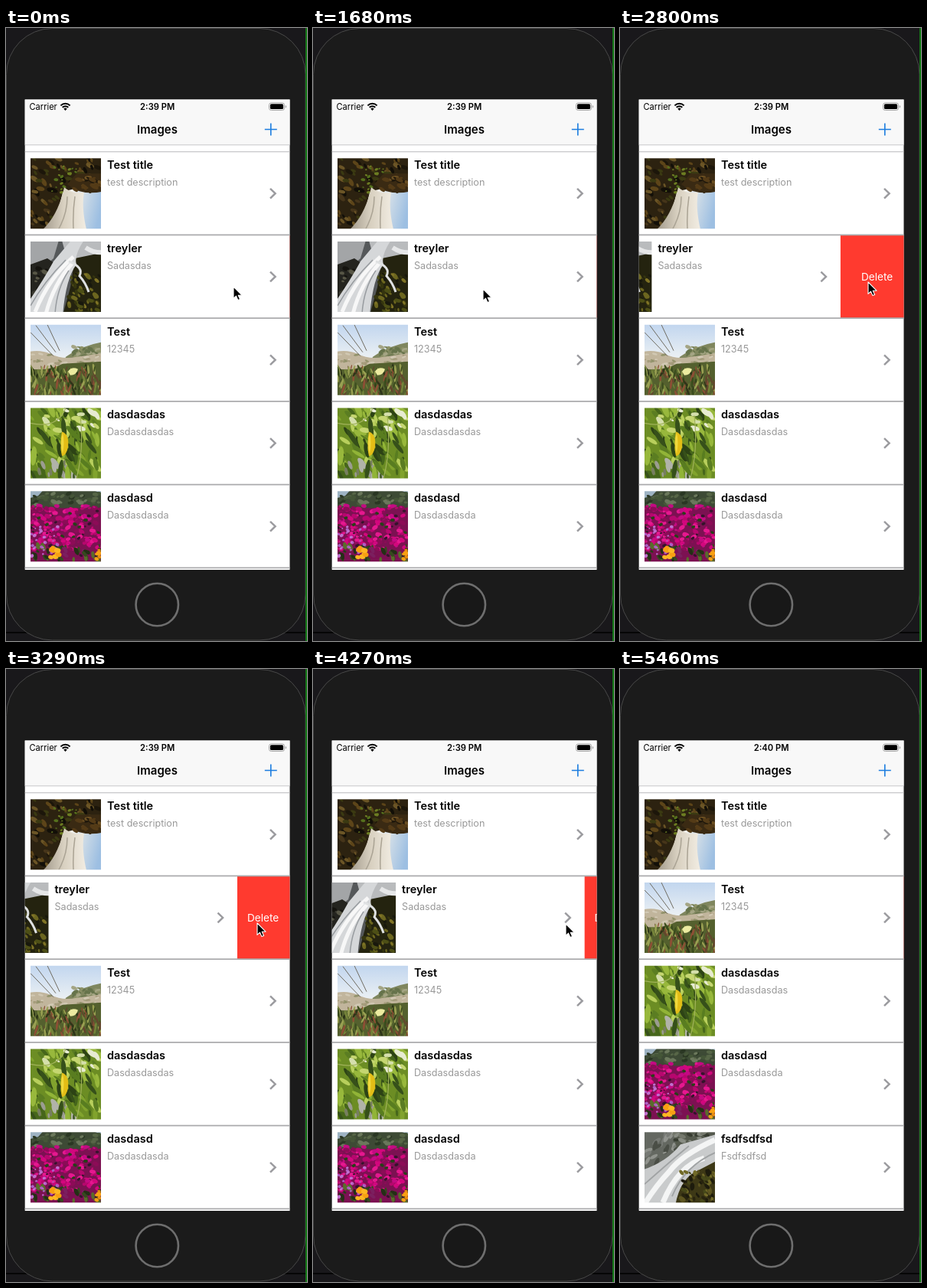
An HTML page that plays this animation: 393x801 px, repeating every 5740 ms.

```html
<!DOCTYPE html>
<html lang="en">
<head>
<meta charset="utf-8">
<title>Swipe to delete</title>
<style>
html, body { margin: 0; width: 100%; height: 100%; overflow: hidden; background: #111; }
svg { display: block; width: 100%; height: 100%; font-family: Inter, Roboto, sans-serif; }
.title { font-size: 14.5px; font-weight: 600; }
.sub { font-size: 12.6px; fill: #999; }
.chev { fill: none; stroke: #9b9b9f; stroke-width: 2.5; }
</style>
</head>
<body>
<svg viewBox="0 0 393 801">
  <defs>
    <clipPath id="screen"><rect x="24.7" y="93.5" width="345.8" height="614.5"/></clipPath>
    <clipPath id="photo"><rect width="92" height="92"/></clipPath>
    <filter id="soft" x="-10%" y="-10%" width="120%" height="120%"><feGaussianBlur stdDeviation=".6"/></filter>
    <linearGradient id="sky" x2="0" y2="1"><stop stop-color="#bdd3ee"/><stop offset=".5" stop-color="#eef2f4"/></linearGradient>
    <linearGradient id="glow" x2="1" y2=".2"><stop offset=".45" stop-color="#f4f1ea"/><stop offset="1" stop-color="#9dbfe2"/></linearGradient>
    <linearGradient id="fall" x2="1" y2="0"><stop stop-color="#9a9284"/><stop offset=".5" stop-color="#d8d0c0"/><stop offset="1" stop-color="#f3eee4"/></linearGradient>
  </defs>

  <rect width="393" height="801" fill="#19181b"/>
  <path d="M0 790H393" stroke="#000" stroke-width="1.5"/>
  <rect x=".5" y=".5" width="390.5" height="799.5" rx="60" fill="#1b1b1b" stroke="#484848"/>
  <path d="M392 0V801" stroke="#157a18" stroke-width="2"/>
  <circle cx="197.3" cy="753.5" r="27.7" fill="#181818" stroke="#6e6e6e" stroke-width="2.6"/>

  <g clip-path="url(#screen)">
    <rect x="24" y="93" width="348" height="616" fill="#fff"/>
    <rect id="red" y="270.8" width="346" height="108.4" fill="#ff3a2f"/>
    <text id="delete" y="330" font-size="13.6" fill="#fff">Delete</text>
    <g id="rows"></g>
    <g id="lines" stroke="#ababad" stroke-width="1.8"></g>
    <rect x="24" y="93" width="348" height="59.5" fill="#f8f8f8"/>
    <path d="M24 152.8H372" stroke="#c6c6c8"/>
  </g>

  <text x="30.5" y="107" font-size="11.1">Carrier</text>
  <g fill="none" stroke="#000" stroke-width="2">
    <path d="M71.4 101.4A8.6 8.6 0 0 1 83.6 101.4"/>
    <path d="M73.7 103.8A5.4 5.4 0 0 1 81.3 103.8"/>
  </g>
  <path d="M75.3 105.6A3 3 0 0 1 79.7 105.6L77.5 108Z"/>
  <text id="clock" x="197.7" y="107" font-size="11.2" font-weight="600" text-anchor="middle"></text>
  <rect x="343.5" y="97.9" width="20" height="9.6" rx="2.8" fill="none" stroke="#a5a5a5"/>
  <rect x="344.9" y="99.3" width="17.2" height="6.8" rx="1.6"/>
  <path d="M364.8 101A1.8 1.8 0 0 1 364.8 104.5Z" fill="#a5a5a5"/>
  <text x="197.5" y="138" font-size="15" font-weight="600" text-anchor="middle">Images</text>
  <path d="M337.8 132.5H353.8M345.8 124.5V140.5" stroke="#1b7cdf" stroke-width="1.6"/>

  <path id="cursor" d="M0 0V15.4L3.5 12.2L5.9 17.6L8.6 16.4L6.2 11.2H11Z" stroke="#fff" stroke-width="1.1" stroke-linejoin="round"/>
</svg>
<script>
const $ = id => document.getElementById(id);
const LOOP = 5740, STEP = 70, TOP = 162, PITCH = 108.75, RIGHT = 370.5;
const REMOVED_AT = 4480, CLOCK_AT = 5110;

function random(seed) {
  return () => (seed = (seed * 16807) % 2147483647) / 2147483647;
}

// Seeded patches of colour inside a box
function scatter(seed, n, [x, y, w, h], rx, ry, tilt, colors) {
  const rnd = random(seed * 7919);
  let out = '';
  for (let i = 0; i < n; i++) {
    const px = x + rnd() * w, py = y + rnd() * h, s = .5 + rnd();
    const angle = tilt + (rnd() - .5) * 70;
    const fill = colors[Math.floor(rnd() * colors.length)];
    out += `<ellipse rx="${rx * s}" ry="${ry * s}" fill="${fill}" transform="translate(${px} ${py}) rotate(${angle})"/>`;
  }
  return out;
}
const shape = (d, fill) => `<path d="${d}" fill="${fill}"/>`;
const stroke = (d, color, width) => `<path d="${d}" fill="none" stroke="${color}" stroke-width="${width}"/>`;
const base = fill => shape('M-5-5H97V97H-5Z', fill);

const photos = {
  cave: () => base('#2c2210')
    + scatter(3, 110, [0, 0, 92, 90], 4, 2, 40, ['#46351a', '#1c160a', '#5d4519', '#3b3a12', '#6b5526', '#120f08'])
    + scatter(8, 20, [15, 8, 45, 38], 2, 1.3, 0, ['#55701d', '#6c7d22'])
    + shape('M42 45Q60 35 78 46L97 32V97H18Q35 78 42 45Z', 'url(#glow)')
    + shape('M44 38Q56 48 70 44Q66 66 74 97H12Q36 76 44 38Z', 'url(#fall)')
    + stroke('M48 50Q48 72 37 92M58 50Q55 70 56 92', '#aaa394', 1.5)
    + shape('M48 34Q66 50 97 43V20H60Z', '#3a2a13')
    + scatter(5, 22, [58, 24, 34, 17], 4, 2, 20, ['#543b17', '#21190c', '#6b4f22']),

  stream: () => base('#55585a')
    + shape('M-5-5H38L30 22L10 40H-5Z', '#a3a5a7')
    + shape('M40-5H97V24L70 30L48 24Z', '#b9bbbd')
    + shape('M-5 32L22 22L34 30L22 50L8 76L-5 84Z', '#24241f')
    + shape('M58 22L97 14V97H42L52 60Z', '#24230f')
    + scatter(11, 55, [50, 42, 42, 50], 3.5, 2, 50, ['#4d4f16', '#6c661f', '#18180d', '#35350f', '#807426'])
    + scatter(12, 18, [2, 32, 20, 36], 3, 2, 30, ['#3a3930', '#15140f', '#575646'])
    + shape('M56-5L72-5Q56 18 60 30Q46 48 42 97H-5V82Q16 52 30 26Z', '#d5d7d9')
    + stroke('M56 20Q24 48 6 92M55 28Q30 55 20 95', '#f7f7f7', 5)
    + stroke('M46 24Q18 52 0 84M50 38Q34 62 32 95', '#979b9f', 1.5)
    + stroke('M50 26Q70 34 64 45Q72 54 76 66', '#dfe1e2', 3)
    + stroke('M72 8Q84 16 97 14', '#e6e7e8', 6),

  dune: () => base('url(#sky)')
    + shape('M46 42Q66 27 97 22V60H40Z', '#7f865e')
    + scatter(17, 35, [55, 29, 37, 14], 3, 1.8, 0, ['#66734b', '#8f9369', '#a4a584'])
    + shape('M-5 36Q12 32 26 38Q42 46 60 42L97 37V70H-5Z', '#c1b59c')
    + scatter(18, 28, [0, 37, 92, 15], 3, 1.2, 0, ['#d1c8b3', '#a89d7e', '#92926b'])
    + shape('M-5 57Q22 62 42 51L97 48V97H-5Z', '#54602e')
    + scatter(19, 150, [0, 55, 92, 38], 5, 1.1, 88, ['#3b4c1d', '#75843a', '#8d4f35', '#2d3518', '#99a052', '#63462d'])
    + stroke('M7 1L33 36M22 0L38 34M0 10L30 41', '#655f52', .9)
    + shape('M49 61Q54 54 62 58Q60 66 52 66Z', '#eceba0'),

  pepper: () => base('#6c8d24')
    + scatter(23, 70, [0, 0, 92, 92], 9, 3, 65, ['#98b83c', '#46661b', '#81a32d', '#2d4315', '#b8cf5c', '#5b7d22'])
    + scatter(24, 18, [0, 0, 92, 30], 5, 2.4, 30, ['#d5dfac', '#c5d671', '#e7ebd2'])
    + scatter(25, 12, [2, 68, 55, 24], 6, 2.5, 70, ['#9b9c91', '#b1b3a9', '#777e60'])
    + scatter(26, 24, [0, 25, 92, 67], 9, 2.2, 65, ['#91b437', '#597d20', '#36501a'])
    + stroke('M0 20Q35 28 46 0M60 92Q70 55 65 10', '#a1b35a', 1.2)
    + shape('M41 31Q51 34 49 51Q47 62 41 63Q38 47 41 31Z', '#e3bd16')
    + shape('M42 32Q45 45 42 60Q38 46 42 32Z', '#f0d93d'),

  flowers: () => base('#7c1152')
    + shape('M-5-5H97V22H-5Z', '#3d4a35')
    + shape('M-5-5H20L10 6L-5 10ZM70-5H97V4Z', '#9eb3c3')
    + scatter(31, 45, [0, 3, 92, 15], 3, 1.8, 0, ['#2a3723', '#576647', '#455638', '#6b785c'])
    + scatter(32, 170, [0, 19, 92, 57], 3, 2, 0, ['#d3077d', '#b7076e', '#e5188f', '#8c0c57', '#c40a83'])
    + scatter(33, 35, [0, 24, 92, 66], 2, 1.4, 0, ['#34142b', '#274018'])
    + scatter(34, 42, [0, 71, 92, 21], 4, 2, 60, ['#36491f', '#596c2b', '#242f16', '#7b1f5f'])
    + scatter(35, 32, [0, 45, 36, 42], 1.8, 1.5, 0, ['#ad5fc3', '#c170cf'])
    + scatter(36, 9, [26, 72, 11, 15], 3, 2.3, 0, ['#f8a013', '#ffb722'])
    + scatter(37, 5, [84, 74, 8, 15], 2.5, 2, 0, ['#f8a013', '#e88a12']),

  moss: () => base('#646861')
    + scatter(41, 30, [0, 0, 50, 42], 5, 2, 130, ['#777a75', '#4a4e46', '#90938d'])
    + shape('M36-5H97V12L72 24L42 20Z', '#555a4e')
    + scatter(42, 18, [40, 0, 50, 12], 4, 2, 0, ['#373c31', '#74786c', '#888c83'])
    + shape('M97 2V42L70 50Q48 62 42 97H-5V50Q28 40 47 16Z', '#c9cbcc')
    + stroke('M92 10Q48 30 32 52Q15 70 0 94M78 34Q44 44 24 92', '#f4f5f5', 7)
    + stroke('M58 18Q36 36 0 68M94 26Q52 44 36 84', '#a0a3a4', 1.8)
    + shape('M97 36L70 50Q46 60 40 97H97Z', '#3d3816')
    + scatter(43, 65, [48, 51, 44, 41], 3.5, 2, 60, ['#5c5420', '#28240f', '#716a28', '#47491a', '#1d1b0d'])
};

const rowData = [
  ['Test title', 'test description', 'cave'],
  ['treyler', 'Sadasdas', 'stream'],
  ['Test', '12345', 'dune'],
  ['dasdasdas', 'Dasdasdasdas', 'pepper'],
  ['dasdasd', 'Dasdasdasda', 'flowers'],
  ['fsdfsdfsd', 'Fsdfsdfsd', 'moss']
];

$('rows').innerHTML = rowData.map(([title, sub, photo]) => `<g>
  <g transform="translate(32 8.2)" clip-path="url(#photo)"><g filter="url(#soft)">${photos[photo]()}</g></g>
  <text class="title" x="132" y="22">${title}</text>
  <text class="sub" x="132" y="44">${sub}</text>
  <path class="chev" d="M345 47.8L351.6 54.2L345 60.6"/>
</g>`).join('');
const rows = [...$('rows').children];

$('lines').innerHTML = rowData.map((_, i) =>
  `<path d="M24 ${TOP + i * PITCH - .3}H372"${i ? '' : ' stroke="#b9b9bb" stroke-width="1.1"'}/>`).join('');

// Keys: [time, ...values]
const pointer = [[0, 297, 338], [770, 297, 338], [1610, 222, 341], [1960, 222, 341],
  [2380, 120, 338], [2800, 324, 332], [3220, 328, 332], [3780, 328, 332], [4200, 330, 333]];
const swipe = [[1960, 0], [2380, -102], [2800, -82.6], [3150, -68.5], [4050, -68.5], [4370, 0]];

function sample(keys, t) {
  const next = keys.findIndex(k => k[0] > t);
  if (next < 0) return keys[keys.length - 1].slice(1);
  if (next === 0) return keys[0].slice(1);
  const a = keys[next - 1], b = keys[next];
  const p = (t - a[0]) / (b[0] - a[0]);
  const e = p * p * (3 - 2 * p);
  return a.slice(1).map((v, i) => v + (b[i + 1] - v) * e);
}

function draw(time) {
  const t = Math.floor(time % LOOP / STEP) * STEP;
  const removed = t >= REMOVED_AT;
  const [shift] = sample(swipe, t);
  const edge = RIGHT + shift;

  rows.forEach((row, i) => {
    const slot = removed && i > 1 ? i - 1 : i;
    row.setAttribute('transform', `translate(${i === 1 ? shift : 0} ${TOP + slot * PITCH})`);
  });
  rows[1].style.display = removed ? 'none' : '';
  $('red').setAttribute('x', edge);
  $('delete').setAttribute('x', Math.max(315, edge + 13));

  const [x, y] = sample(pointer, t);
  $('cursor').setAttribute('transform', `translate(${x} ${y})`);
  $('cursor').style.display = removed ? 'none' : '';
  $('clock').textContent = t >= CLOCK_AT ? '2:40 PM' : '2:39 PM';
}

const start = performance.now();
function tick() {
  draw(performance.now() - start);
  requestAnimationFrame(tick);
}
tick();
</script>
</body>
</html>
```
